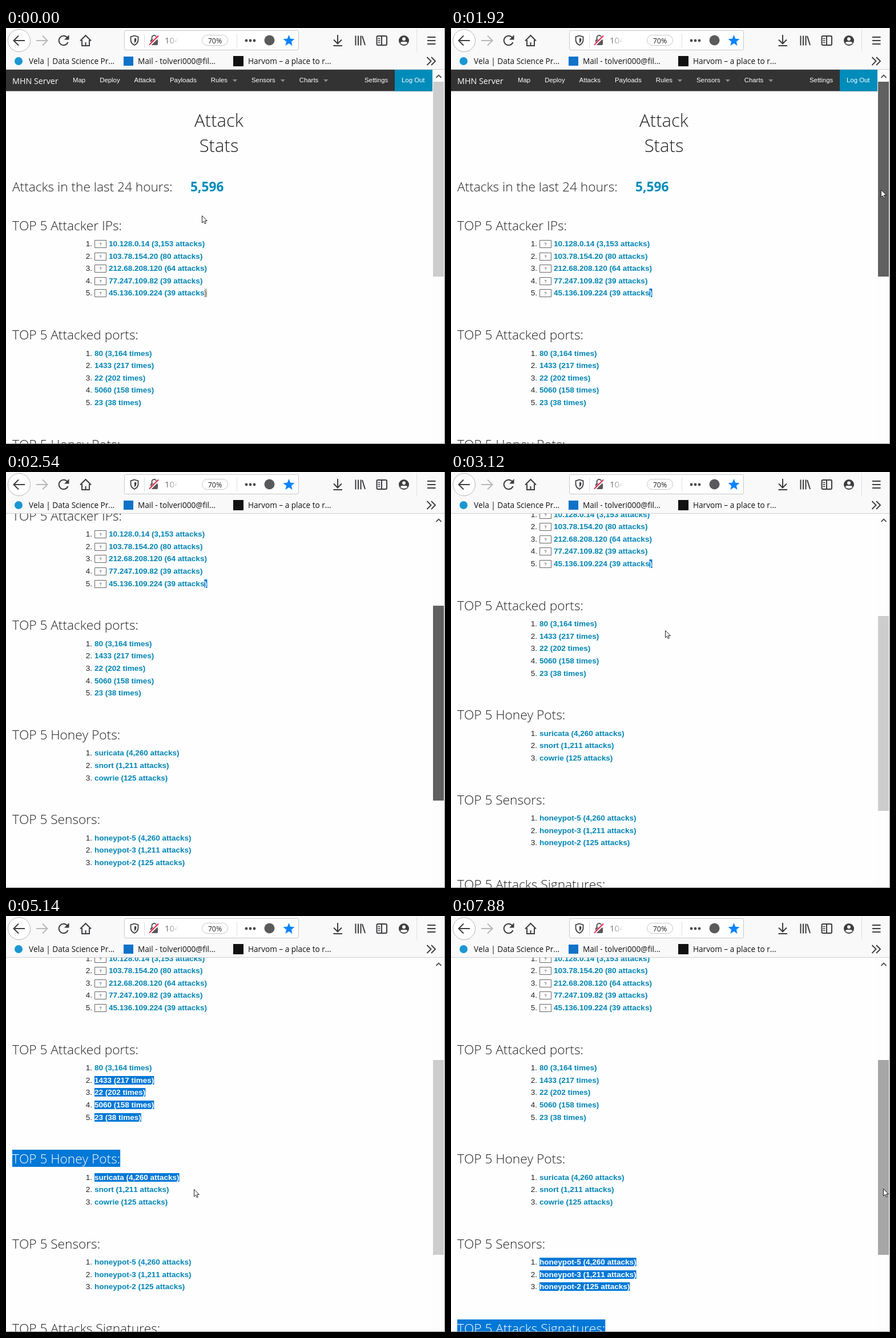
An HTML page with a canvas that plays this animation: 769 by 728 pixels, repeating every 8000 ms.

```html
<!DOCTYPE html>
<html lang="en">
<head>
<meta charset="utf-8">
<title>Attack stats</title>
<style>
html, body { margin: 0; width: 100%; height: 100%; overflow: hidden; background: #fefefe; }
canvas { display: block; }
</style>
</head>
<body>
<canvas width="769" height="728"></canvas>
<script>
const ctx = document.querySelector('canvas').getContext('2d');
const LOOP = 8000, STEP = 120, SCROLL_END = 303.35, ROW = 21.6;
const BLUE = '#008cba', LINK_INK = '#0085b5', INK = '#222', ICON = '#3d3d40', SELECT = '#0078d7';
const SANS = '"Open Sans", "Noto Sans", sans-serif';
const ARIAL = '"Liberation Sans", Arial, sans-serif';
const H2 = `300 31.1px ${SANS}`, H3 = `300 22.7px ${SANS}`;
const ITEM = `13.5px ${ARIAL}`, LINK = `bold ${ITEM}`, NAV = `11.4px ${ARIAL}`;

const sections = [
  ['TOP 5 Attacker IPs:', '10.128.0.14 (3,153 attacks)', '103.78.154.20 (80 attacks)',
    '212.68.208.120 (64 attacks)', '77.247.109.82 (39 attacks)', '45.136.109.224 (39 attacks)'],
  ['TOP 5 Attacked ports:', '80 (3,164 times)', '1433 (217 times)', '22 (202 times)',
    '5060 (158 times)', '23 (38 times)'],
  ['TOP 5 Honey Pots:', 'suricata (4,260 attacks)', 'snort (1,211 attacks)', 'cowrie (125 attacks)'],
  ['TOP 5 Sensors:', 'honeypot-5 (4,260 attacks)', 'honeypot-3 (1,211 attacks)', 'honeypot-2 (125 attacks)'],
  ['TOP 5 Attacks Signatures:']
];

// Mouse moves after the opening circle: start time, number of steps, end point.
const moves = [
  [850, 2, 665, 376], [1120, 3, 745, 283], [1520, 1, 753, 283], [2680, 1, 375, 277],
  [3400, 2, 490, 304], [3670, 1, 440, 259], [4350, 1, 440, 311], [4500, 4, 345, 472],
  [5140, 1, 329, 478], [5270, 1, 350, 516], [5420, 1, 357, 517], [5880, 2, 363, 533],
  [6160, 1, 379, 566], [6310, 3, 496, 787], [7160, 1, 582, 636], [7280, 6, 757, 477]
];

const clamp = (value, max) => Math.max(0, Math.min(max, value));
const progress = (time, start, steps) =>
  clamp(Math.floor((time - start) / STEP) + 1, steps) / steps;

function cursorAt(time) {
  if (time < 150) return [343, 328];
  const angle = -(10 + 60 * clamp(Math.floor((time - 150) / 135), 4)) * Math.PI / 180;
  let x = 365 + 69 * Math.cos(angle), y = 292 + 65 * Math.sin(angle);
  for (const [start, steps, toX, toY] of moves) {
    const p = progress(time, start, steps);
    x += (toX - x) * p;
    y += (toY - y) * p;
  }
  return [Math.round(x), Math.round(y)];
}

function scrollAt(time) {
  const p = progress(time, 2170, 5), rise = p ** 1.478;
  return SCROLL_END * rise / (rise + (1 - p) ** 1.478);
}

// Vertical extent of the drag selection on the screen.
function selectionAt(time) {
  if (time >= 6310) return [590, cursorAt(Math.min(time, 7000))[1]];
  if (time >= 4500 && time < 6160) return [275, cursorAt(time)[1]];
  return [0, 0];
}

function rect(x, y, w, h, color) {
  ctx.fillStyle = color;
  ctx.fillRect(x, y, w, h);
}
function text(str, x, y, font, color, align = 'left') {
  ctx.font = font;
  ctx.fillStyle = color;
  ctx.textAlign = align;
  ctx.fillText(str, x, y);
}
function widthOf(str, font) {
  ctx.font = font;
  return ctx.measureText(str).width;
}
function line(d, color = ICON, width = 2) {
  ctx.strokeStyle = color;
  ctx.lineWidth = width;
  ctx.stroke(new Path2D(d));
}
function shape(d, color) {
  ctx.fillStyle = color;
  ctx.fill(new Path2D(d));
}
function disc(x, y, r, color) {
  ctx.beginPath();
  ctx.arc(x, y, r, 0, 7);
  ctx.fillStyle = color;
  ctx.fill();
}
function box(x, y, w, h, r, stroke, fill, width = 1) {
  ctx.beginPath();
  ctx.roundRect(x, y, w, h, r);
  if (fill) { ctx.fillStyle = fill; ctx.fill(); }
  ctx.strokeStyle = stroke;
  ctx.lineWidth = width;
  ctx.stroke();
}

function drawNavbar(top) {
  rect(0, top, 747, 37.5, '#333');
  rect(681, top, 66, 37.5, BLUE);
  text('MHN Server', 11, top + 25, `14.3px ${SANS}`, '#fff');
  let x = 117;
  for (const name of ['Map', 'Deploy', 'Attacks', 'Payloads', 'Rules', 'Sensors', 'Charts']) {
    text(name, x, top + 22, NAV, '#fff');
    x += widthOf(name, NAV) + 25;
    if (/Rules|Sensors|Charts/.test(name)) {
      shape(`M${x - 16} ${top + 17}h8l-4 4.5z`, '#8c8c8c');
      x += 17;
    }
  }
  text('Settings', 628, top + 22, NAV, '#fff');
  text('Log Out', 693, top + 22, NAV, '#fff');
}

function drawPage(time, scroll) {
  const [from, to] = selectionAt(time);
  const y = value => Math.round(value - scroll);
  const selectable = (str, x, base, font, color) => {
    const selected = base > from && base + 11 <= to;
    const [up, down] = font === H3 ? [24, 6] : [12, 3];
    if (selected) rect(x, base - up, widthOf(str, font), up + down, SELECT);
    text(str, x, base, font, selected ? '#fff' : color);
  };
  drawNavbar(73 - Math.round(scroll));
  text('Attack', 373, y(173), H2, INK, 'center');
  text('Stats', 373, y(217), H2, INK, 'center');
  text('Attacks in the last 24 hours:', 11, y(286), H3, INK);
  text('5,596', 323, y(286), `bold 22.7px ${SANS}`, BLUE);

  let top = 353.5;
  sections.forEach(([title, ...items], section) => {
    const x = section ? 155 : 180;
    selectable(title, 11, y(top), H3, INK);
    items.forEach((item, row) => {
      const base = y(top + 28.5 + row * ROW);
      text(`${row + 1}.`, 151, base, ITEM, INK, 'right');
      selectable(item, x, base, LINK, LINK_INK);
      if (section) return;
      box(155.5, base - 10.5, 20, 13, 0, '#666');
      text('?', 165.5, base - 1.5, `7px ${ARIAL}`, '#333', 'center');
    });
    if (!section && time < 4080) {
      const focused = time >= 1920;
      const base = y(top + 28.5 + 4 * ROW);
      const start = x + widthOf(items[4].slice(0, -1), LINK);
      rect(start, base - 12, 5, 15, focused ? SELECT : '#c8c8c8');
      text(')', start, base, LINK, focused ? '#fff' : '#a8896a');
    }
    top += 83.6 + items.length * ROW;
  });
}

function drawScrollbar(time, scroll, cursorX) {
  const dragged = time >= 1920 && time < 3120;
  rect(747, 73, 21, 655, '#fdfdfd');
  line('M753.5 87l4.5-4.5 4.5 4.5', '#505050', 1.8);
  rect(748, Math.round(94 + scroll * 0.522), 19, 341,
    dragged ? '#606060' : cursorX >= 748 ? '#a6a6a6' : '#cdcdcd');
}

function drawAddressBar() {
  box(207.5, 4.5, 305, 34, 2, '#c8c8ca', '#fff');
  line('M225 13.5L231.5 15.5V21C231.5 26 228 28.5 225 30C222 28.5 218.5 26 218.5 21V15.5Z', ICON, 1.8);
  shape('M225 17.5v9q3.3-2.5 3.3-5.5v-2.5z', ICON);
  rect(242, 10, 1, 24, '#dcdcde');
  line('M255.5 21v-4a4 4 0 0 1 8 0v4', '#58585b');
  box(253.5, 20.5, 12, 9, 1, '#58585b', '#58585b');
  line('M251.5 30l16-16', '#fff', 4.5);
  line('M251 29.5l16-16', '#e22850');
  const fade = ctx.createLinearGradient(279, 0, 303, 0);
  fade.addColorStop(0, '#555');
  fade.addColorStop(1, '#fff');
  text('104', 278, 27, `15px ${SANS}`, fade);
  rect(301, 8, 8, 28, '#fff');
  box(343.5, 12.5, 45, 18, 9, '#c8c8ca', '#fff');
  text('70%', 366, 27, `12.5px ${SANS}`, INK, 'center');
  rect(404, 10, 1, 24, '#e0e0e2');
  for (let i = -1; i < 2; i++) disc(428 + 7 * i, 22, 2.4, '#4a4a4d');
  disc(461.5, 21.5, 9, '#5a5a5d');
  ctx.beginPath();
  for (let i = 0; i < 10; i++) {
    const r = i % 2 ? 4.6 : 10.5, angle = i * Math.PI / 5;
    ctx.lineTo(495.5 + r * Math.sin(angle), 22.5 - r * Math.cos(angle));
  }
  ctx.fillStyle = '#0a84ff';
  ctx.fill();
}

function drawToolbar() {
  rect(0, 0, 769, 72, '#f9f9fa');
  rect(0, 72, 769, 1, '#d0d0d2');
  box(3.5, 2.5, 39, 39, 19.5, '#b5b5b8', '#fff');
  line('M14 22H33M22 13.5L13.5 22L22 30.5');
  line('M53 22H72M64 13.5L72.5 22L64 30.5', '#b8b8bb');
  line('M107.5 17A8.2 8.2 0 1 0 108.5 25');
  shape('M110.5 12v8.5h-8.5z', ICON);
  line('M130 22.5L139.5 13L149 22.5M133 21V31H146V21M139.5 31v-6');
  drawAddressBar();

  line('M581 12V27M574 20.5l7 7 7-7M573.5 31h15.5');
  line('M612.5 13.5v17M617 13.5v17M621.5 13.5v17M624 14L629 30');
  box(649.5, 14, 17.5, 16, 2, ICON, null, 2);
  line('M658 14v16');
  line('M651.5 18.5h4m-4 3.5h4m-4 3.5h4', ICON, 1.3);
  disc(697, 22, 9, ICON);
  disc(697, 19.2, 3, '#f9f9fa');
  shape('M691 27q0-3 3-3h6q3 0 3 3q-6 4-12 0z', '#f9f9fa');
  rect(719, 2, 1, 39, '#e0e0e2');
  line('M738 16h14.5m-14.5 6h14.5m-14.5 6h14.5');

  const bookmark = `13.6px ${SANS}`;
  disc(22, 58, 7, '#1b96d2');
  text('Vela | Data Science Pr...', 40, 63, bookmark, '#111');
  rect(206, 50, 17, 16, '#0f72c8');
  text('Mail - tolveri000@fil...', 231, 63, bookmark, '#111');
  rect(398, 49, 18, 18, '#111');
  text('Harvom – a place to r...', 424, 63, bookmark, '#111');
  line('M737.5 51l7 7-7 7M745 51l7 7-7 7', ICON, 1.9);
}

function drawCursor(x, y) {
  const arrow = `M${x + 0.5} ${y + 0.5}v12.5l2.9-2.7 1.9 4.4 2-.9-1.9-4.3h4z`;
  shape(arrow, '#fff');
  line(arrow, '#222', 1);
}

function draw() {
  const time = performance.now() % LOOP;
  const scroll = scrollAt(time);
  const [x, y] = cursorAt(time);
  const scrolling = scroll > 0 && time < 2680;
  ctx.fontKerning = 'none';
  rect(0, 0, 769, 728, '#fefefe');
  drawPage(time, scroll);
  drawScrollbar(time, scroll, x);
  drawToolbar();
  rect(768, 0, 1, 728, '#8c8c8c');
  rect(0, 727, 769, 1, '#8c8c8c');
  if (!scrolling) drawCursor(x, y);
  requestAnimationFrame(draw);
}
draw();
</script>
</body>
</html>
```
